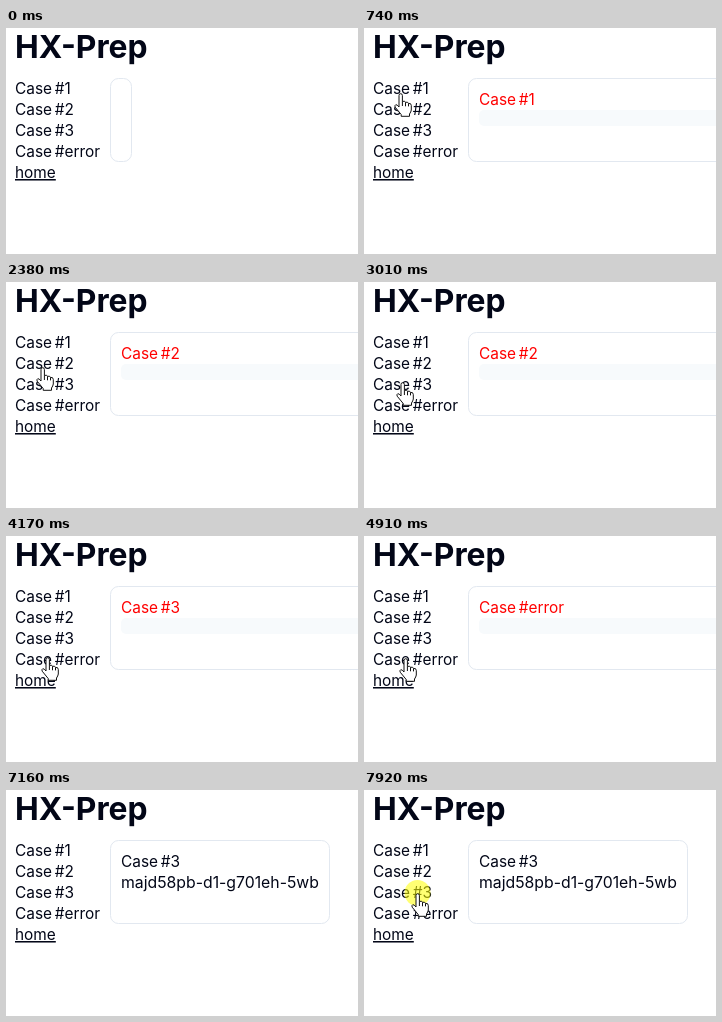
Write an HTML page that moves like this. It is 352 px wide and 226 px high and loops after 7.99 s.

```html
<!DOCTYPE html>
<html lang="en">
<head>
<meta charset="utf-8">
<title>HX-Prep</title>
<style>
  html, body { margin: 0; height: 100%; overflow: hidden; background: #fff; }
  svg { display: block; width: 352px; height: 226px; }
  text { font: 15.4px Inter, sans-serif; word-spacing: -1.5px; fill: #020617; }
  .title { font-size: 31.8px; font-weight: 700; }
  .id { font-size: 15.8px; }
  .mono { font: 16px "Noto Sans Mono", monospace; word-spacing: 0; }
  .link { text-decoration: underline 1px; }
  .cursor path { fill: #fff; stroke: #111; stroke-linejoin: round; }
</style>
</head>
<body>
<svg viewBox="0 0 352 226">
  <text class="title" x="9" y="30">HX-Prep</text>
  <text x="9" y="66">Case #1</text>
  <text x="9" y="87">Case #2</text>
  <text x="9" y="108">Case #3</text>
  <text x="9" y="129">Case #error</text>
  <text class="link" x="9" y="150">home</text>

  <rect id="card" x="104.5" y="50.5" height="83" rx="8" fill="#fff" stroke="#e2e8f0"/>
  <text id="caseName" x="115" y="77"></text>
  <text id="caseId" class="id" x="115" y="98"></text>
  <rect id="skeleton" x="115" y="82" width="500" height="16" rx="5" fill="#f7fafc"/>

  <g id="modal">
    <rect width="352" height="226" fill="#000" opacity=".4"/>
    <rect x="26" y="92" width="500" height="300" rx="8" fill="#fff"/>
    <text class="title" x="50" y="146">Error</text>
    <text x="50" y="183">Rejected</text>
    <text class="mono" x="50" y="220">Error: Rejected</text>
  </g>

  <g id="cursor" class="cursor">
    <circle id="halo" cx=".5" r="13" fill="#ff0" opacity=".55"/>
    <path id="arrow" d="M.5 .5V16.5L4.3 13L6.8 18.7L9.3 17.6L6.8 12H12Z"/>
    <g id="hand" transform="translate(-6 0)">
      <path d="M5 14V2.5Q5 .7 6.7 .7T8.4 2.5V8.5Q11 7.5 11.5 9.3Q14 8.6 14.5 10.4Q17.3 10 17.3 12.5V17Q17 19 15.5 21V23.3H7.2V21.5L1.2 14.2Q.3 12.5 1.8 11.7Q3 11.4 5 14Z"/>
      <path d="M8.4 8.5v4.5M11.5 9.3v4M14.5 10.4v3" style="fill:none"/>
    </g>
  </g>
</svg>
<script>
const LOOP = 7990, MODAL_TIME = 1200;
const PRESS = 130, RESPONSE = 1045; // mouse button held, server delay

const requests = [
  { click: 605, name: "1", id: "majd56lk-d1-k3v9qa-7rt" },
  { click: 1980, name: "2", id: "majd57mz-d1-x482nf-3kc" },
  { click: 3350, name: "3", id: "majd58pb-d1-g701eh-5wb" },
  { click: 4780, name: "error" }, // rejected
  { click: 7920, name: "3" },
];

// Each visit enters at a point, then glides from stop to stop
const visits = [
  { enter: 130, leave: 6560, from: { x: 10, y: 178 }, glides: [
    { start: 130, end: 540, x: 36, y: 65 },
    { start: 880, end: 1280, x: 36, y: 81 },
    { start: 2310, end: 3010, x: 38, y: 100 },
    { start: 3620, end: 4310, x: 41, y: 122 },
    { start: 6350, end: 6490, x: 145, y: 143 },
  ] },
  { enter: 7230, leave: LOOP, from: { x: 300, y: 215 }, glides: [
    { start: 7160, end: 7780, x: 53, y: 103 },
  ] },
];

const $ = id => document.getElementById(id);
const show = (id, on) => $(id).setAttribute("display", on ? "inline" : "none");
const easeOut = k => 1 - (1 - k) ** 2;

function tipAt(t, { from, glides }) {
  let { x, y } = from;
  for (const g of glides) {
    const k = easeOut(Math.min(1, Math.max(0, (t - g.start) / (g.end - g.start))));
    x += (g.x - x) * k;
    y += (g.y - y) * k;
  }
  return [Math.round(x), Math.round(y)];
}

function cardAt(t) {
  let card = { name: "", id: "" };
  for (const { click, name, id } of requests) {
    const sent = click + PRESS;
    if (t >= sent + RESPONSE) card = id ? { name, id } : card;
    else if (t >= sent) return { name, id: "", loading: true };
  }
  return card;
}

function drawCard(t) {
  const { name, id, loading } = cardAt(t);
  $("card").setAttribute("width", loading ? 600 : name ? 219 : 21);
  $("caseName").textContent = name && "Case #" + name;
  $("caseName").style.fill = loading ? "#f00" : "";
  $("caseId").textContent = id;
  show("skeleton", loading);
}

function drawCursor(t, modal) {
  const visit = visits.find(v => t >= v.enter && t < v.leave);
  show("cursor", visit);
  if (!visit) return;
  const [x, y] = tipAt(t, visit);
  const overLink = !modal && x >= 9 && x < 94 && y >= 51 && y < 154;
  $("cursor").setAttribute("transform", `translate(${x} ${y})`);
  show("hand", overLink);
  show("arrow", !overLink);
  show("halo", requests.some(({ click }) => t >= click && t < click + PRESS));
}

function draw(now) {
  const t = now % LOOP;
  const rejected = requests.find(r => !r.id).click + PRESS + RESPONSE;
  const modal = t >= rejected && t < rejected + MODAL_TIME;
  drawCard(t);
  show("modal", modal);
  drawCursor(t, modal);
  requestAnimationFrame(draw);
}
draw(0);
</script>
</body>
</html>
```
